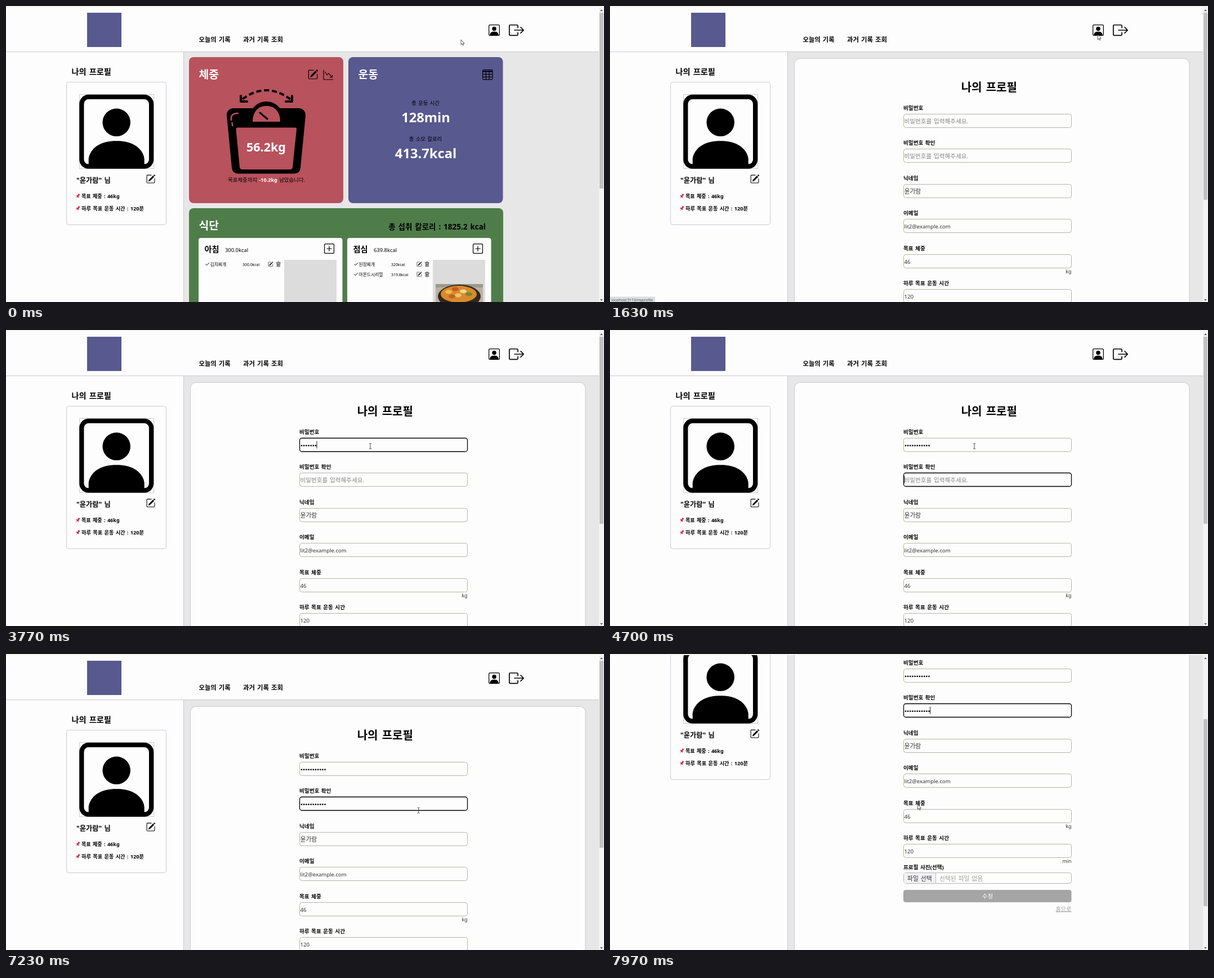
Write an HTML page that moves like this. It is 1062 px wide and 527 px high and loops after 8 s.

```html
<!DOCTYPE html>
<html lang="ko">
<head>
<meta charset="utf-8">
<title>나의 프로필</title>
<style>
html, body { margin: 0; width: 100%; height: 100%; overflow: hidden; background: #fdfdfd; }
svg { display: block; width: 100vw; height: 100vh; }
text { font-family: "Noto Sans", "Noto Sans CJK KR", "Noto Sans CJK", sans-serif; word-spacing: .1em; white-space: pre; }
</style>
</head>
<body>
<svg id="stage" viewBox="0 0 1062 527" xmlns="http://www.w3.org/2000/svg"></svg>
<script>
const RED = '#b8525c', PURPLE = '#57598f', GREEN = '#4f7d4a', LINE = '#c9cad6';

const rect = (x, y, w, h, fill, r = 0, extra = '') =>
  `<rect x="${x}" y="${y}" width="${w}" height="${h}" rx="${r}" fill="${fill}" ${extra}/>`;
const text = (x, y, size, str, { w = 400, fill = '#000', anchor = 'start', extra = '' } = {}) =>
  `<text x="${x}" y="${y}" font-size="${size}" font-weight="${w}" fill="${fill}" text-anchor="${anchor}" ${extra}>${str}</text>`;
const bold = (x, y, size, str, fill = '#000', anchor = 'start') =>
  text(x, y, size, str, { w: 700, fill, anchor });

// Icons on a 16 unit grid
const stroke = (d, w = 1) =>
  `<path d="${d}" fill="none" stroke="#000" stroke-width="${w}" stroke-linecap="round" stroke-linejoin="round"/>`;
const icons = {
  edit: stroke('M9 1.5H2.5a1 1 0 0 0-1 1v11a1 1 0 0 0 1 1h11a1 1 0 0 0 1-1v-6') +
    '<path d="M12.5 1.7l1.9 1.9 1.1-1.1a.5.5 0 0 0 0-.7L14.2.6a.5.5 0 0 0-.7 0zM11.8 2.4l2 2-7 6.9-2.8.9.9-2.8z"/>',
  graph: stroke('M.5 .5v15h15M2.8 3.4L6 8.2l2.5-2.6 5 6.2M10.5 12H14V8.5'),
  table: stroke('M2 .5h12a1.5 1.5 0 0 1 1.5 1.5v12a1.5 1.5 0 0 1-1.5 1.5H2A1.5 1.5 0 0 1 .5 14V2A1.5 1.5 0 0 1 2 .5zM.5 7.5h15M.5 11.5h15M5.5 4v11.5M10.5 4v11.5') +
    '<path d="M.5 2h15v2H.5z"/>',
  person: '<circle cx="8" cy="6" r="3"/><path fill-rule="evenodd" d="M2 0h12a2 2 0 0 1 2 2v12a2 2 0 0 1-2 2H2a2 2 0 0 1-2-2V2a2 2 0 0 1 2-2zM14 1H2a1 1 0 0 0-1 1v12a1 1 0 0 0 1 1v-1c0-1 1-4 6-4s6 3 6 4v1a1 1 0 0 0 1-1V2a1 1 0 0 0-1-1z"/>',
  exit: stroke('M9.5 5.5v-2a1 1 0 0 0-1-1h-7a1 1 0 0 0-1 1v9a1 1 0 0 0 1 1h7a1 1 0 0 0 1-1v-2M6 8h9.400M12.500 5l3 3-3 3'),
  plus: stroke('M2 .5h12a1.5 1.5 0 0 1 1.5 1.5v12a1.5 1.5 0 0 1-1.5 1.5H2A1.5 1.5 0 0 1 .5 14V2A1.5 1.5 0 0 1 2 .5zM8 4.3v7.4M4.3 8h7.4', 1.1),
  trash: stroke('M2 3.2h12M6 3V1.2h4V3M3.2 3.5l.7 11.5h8.2l.7-11.5M6 6v6.5M8 6v6.5M10 6v6.5', 1.1),
  check: stroke('M2 8.5l4 4L14 4', 2),
  pin: '<g transform="rotate(38 8 8)" stroke-linecap="round"><path d="M8 10v6" stroke="#777" stroke-width="1.4"/><path d="M5 0h6v2l-1 1v3.5l3 2.5v2H3V9l3-2.5V3L5 2z" fill="#d21f3a"/></g>'
};
const icon = (name, x, y, size) => `<g transform="translate(${x} ${y}) scale(${size / 16})">${icons[name]}</g>`;

function frame() {
  return rect(0, 0, 1062, 81, '#fdfdfd') + rect(0, 81, 1062, 1, LINE) +
    rect(144, 12, 61, 61, PURPLE) +
    bold(342.5, 63.5, 11.3, '오늘의 기록') + bold(421, 63.5, 11.4, '과거 기록 조회') +
    icon('person', 857, 33, 20) + icon('exit', 893, 29.5, 27) +
    rect(0, 82, 315, 800, '#fdfdfd') + rect(315, 82, 1, 800, LINE) +
    bold(116.5, 121.5, 14.2, '나의 프로필') +
    rect(107.5, 135.5, 177, 254, '#fdfdfd', 4, `stroke="${LINE}"`) +
    rect(130.5, 157.5, 132, 132, 'none', 0, 'stroke="#ccc"') + icon('person', 130.2, 157.8, 132) +
    bold(125, 315, 12.2, '"윤가람" 님') + icon('edit', 248.5, 299.5, 17) +
    icon('pin', 123, 334, 9) + bold(134, 342, 9.1, '목표 체중 : 46kg') +
    icon('pin', 123, 356, 9) + bold(134, 364, 9.2, '하루 목표 운동 시간 : 120분');
}

function scaleArt() {
  return `<path d="M420 166Q462 134 505 166" fill="none" stroke="#000" stroke-width="4" stroke-dasharray="9 5"/>
    <path d="M417 160v10h11M508 160v10h-11" fill="none" stroke="#000" stroke-width="4" stroke-linecap="round" stroke-linejoin="round"/>
    <circle cx="462.5" cy="200" r="30"/>
    <path d="M404 182H520a12 12 0 0 1 12 13L523 288q-1 10.500-12 10.500H413q-11 0-12-10.500L392 195a12 12 0 0 1 12-13z"/>
    <path d="M438 206C438 188 448 178 462.500 178S487 188 487 206z" fill="${RED}"/>
    <path d="M451 190L464 201" stroke="#000" stroke-width="3" stroke-linecap="round"/>
    <path d="M411 216.500H513.500q3 0 2.500 3L509 287q-.5 4-5 4H420q-4.500 0-5-4L408.500 219.500q-.5-3 2.500-3z" fill="${RED}"/>
    <path d="M400 203q-2-12 12-12M401.500 208l.8 5" fill="none" stroke="${RED}" stroke-width="2.500" stroke-linecap="round"/>`;
}

function foodRow(x, y, name, kcal) {
  return icon('check', x + 11.5, y - 7, 8) + text(x + 20.5, y, 7.8, name) + text(x + 78, y, 6.9, kcal) +
    icon('edit', x + 123, y - 7.5, 9.5) + icon('trash', x + 137, y - 7.5, 9.5);
}

function meal(x, name, kcal, rows) {
  return rect(x, 413, 255.5, 300, '#fdfdfd', 4) + bold(x + 10.5, 437.5, 14.2, name) +
    text(x + 47, 437.5, 9.4, kcal) + icon('plus', x + 223, 423, 18) +
    rect(x + 152, 452, 93, 100, '#dcdcdc') +
    rows.map((r, i) => foodRow(x, 462.5 + 18 * i, ...r)).join('');
}

function soup() {
  const bits = [[786, 509, '#e8c04a'], [798, 504, '#c8552a'], [812, 508, '#f0d68a'], [822, 513, '#6f8a35'], [803, 515, '#eac566'], [792, 517, '#c2602a']];
  return rect(763, 495, 84, 40, '#b9b2a3') + rect(763, 495, 84, 6, '#9b9a8d') +
    '<ellipse cx="805" cy="517" rx="38" ry="21" fill="#33271f"/><ellipse cx="804" cy="513" rx="32" ry="15" fill="#d98a2b"/>' +
    bits.map(([x, y, c]) => `<ellipse cx="${x}" cy="${y}" rx="6" ry="3.500" fill="${c}"/>`).join('');
}

function dashboard() {
  return rect(325, 91, 274, 260, RED, 8) + bold(342.5, 128.5, 19.3, '체중', '#fff') +
    icon('edit', 535.5, 112.5, 19) + icon('graph', 563.5, 113.5, 18) + scaleArt() +
    bold(462, 259, 21.5, '56.2kg', '#fff', 'middle') +
    text(462.5, 312.5, 9.4, '목표체중까지 <tspan font-weight="700" fill="#fff" font-size="9.1">-10.2kg</tspan> 남았습니다.', { anchor: 'middle' }) +
    rect(608, 91, 274.5, 260, PURPLE, 8) + bold(625.5, 128.5, 19.3, '운동', '#fff') + icon('table', 846, 113, 18.5) +
    text(745, 175.5, 9.3, '총 운동 시간', { w: 500, anchor: 'middle' }) +
    bold(745.5, 207, 23.7, '128min', '#fff', 'middle') +
    text(745, 239.5, 9.4, '총 소모 칼로리', { w: 500, anchor: 'middle' }) +
    bold(745.5, 270.5, 23.7, '413.7kcal', '#fff', 'middle') +
    rect(325, 360, 558, 400, GREEN, 8) + bold(342.5, 398, 19.3, '식단', '#fff') +
    bold(852, 397.5, 13.5, '총 섭취 칼로리 : 1825.2 kcal', '#000', 'end') +
    meal(342, '아침', '300.0kcal', [['김치찌개', '300.0kcal']]) +
    meal(606, '점심', '639.8kcal', [['된장찌개', '320kcal'], ['아몬드시리얼', '319.8kcal']]) + soup();
}

const fieldY = i => Math.round(192 + 62.4 * i) + 0.5;
function profile() {
  const fields = [['비밀번호'], ['비밀번호 확인'], ['닉네임', '윤가람', 10.8], ['이메일', 'lit2@example.com', 9.5],
    ['목표 체중', '46', 9.7], ['하루 목표 운동 시간', '120', 9.7]];
  const note = (y, str) => text(819.5, y, 8.9, str, { anchor: 'end', fill: '#333' });
  return rect(327.5, 93.5, 701.5, 700, '#fdfdfd', 10, `stroke="${LINE}"`) +
    bold(673.3, 151.5, 20, '나의 프로필', '#000', 'middle') +
    fields.map(([label, value, size], i) =>
      bold(521, fieldY(i) - 7.2, 9.6, label) +
      rect(521.5, fieldY(i), 298, 24, '#fdfdfd', 4, `id="box${i}" stroke="#b5b5a6"`) +
      (value ? text(522.5, fieldY(i) + 16.3, size, value, { fill: '#333' }) : `<g id="secret${i}"></g>`)).join('') +
    note(475.5, 'kg') + note(538, 'min') +
    bold(521, 548.8, 9.6, '프로필 사진(선택)') +
    rect(521.5, 555.5, 298, 19, '#fdfdfd', 4, 'stroke="#b5b5b0"') +
    rect(522, 556, 56, 18, '#f3f3f6', 3) + rect(578, 556, 1, 18, '#b9b9c8') +
    text(528, 570, 10.8, '파일 선택', { fill: '#333' }) + text(585, 570, 10.8, '선택된 파일 없음', { fill: '#a0a0a0' }) +
    rect(521, 586, 298.5, 22, '#a5a5a5', 4) +
    text(670.5, 601, 10.6, '수정', { fill: '#fff', anchor: 'middle' }) +
    text(819.5, 623.5, 10.2, '홈으로', { fill: '#a0a0a0', anchor: 'end', extra: 'text-decoration="underline"' });
}

document.getElementById('stage').innerHTML =
  rect(0, 0, 1062, 527, '#fdfdfd') +
  `<g id="page">${rect(316, 82, 738, 800, '#e7e7e7')}${frame()}<g id="home">${dashboard()}</g><g id="form">${profile()}</g></g>` +
  rect(0, 0, 1062, 2, '#fdfdfd') + rect(0, 1, 1062, 1, '#f1f1e2') +
  rect(1053, 2, 9, 525, '#f3f3f3') + rect(1054, 12, 7, 333, '#c1c1c1', 0, 'id="thumb"') +
  '<path d="M1055 9l2.500-3 2.500 3zM1055 522l2.500 3 2.500-3z" fill="#606060"/>' +
  `<g id="status">${rect(0, 517.5, 80, 10, '#dcdee1')}${text(2.5, 525.5, 6.35, 'localhost:5173/myprofile', { fill: '#555' })}</g>` +
  `<g id="cursor"><path id="arrow" d="M0 0v8.800l2-1.800 1.400 3 1.400-.7-1.400-2.900h2.700z" fill="#fff" stroke="#333" stroke-width=".8"/>
   <path id="beam" d="M-2-5h1.500l.5.500.5-.5H2M-2 4.500h1.500l.5-.5.5.5H2M0-4.500V4" fill="none" stroke="#333" stroke-width=".9"/></g>`;

const $ = id => document.getElementById(id);
const show = (id, on) => { $(id).style.display = on ? '' : 'none'; };

// Eased track through [time, ...values] points
function track(points, t, ease = k => k) {
  let i = 0;
  while (i < points.length - 2 && t >= points[i + 1][0]) i++;
  const [a, b] = [points[i], points[i + 1]];
  const k = ease(Math.min(1, Math.max(0, (t - a[0]) / (b[0] - a[0]))));
  return a.slice(1).map((v, j) => v + (b[j + 1] - v) * k);
}
const smooth = k => k * k * (3 - 2 * k);

const pointer = [[0, 808, 60], [150, 808, 60], [700, 866, 51], [1750, 866, 51], [2350, 645.5, 209],
  [2500, 645.5, 209], [2600, 647, 207], [6750, 647, 207], [7250, 733, 279], [7720, 733, 279], [7970, 546.5, 268]];
const wheel = [[7430, 0], [7500, 26], [7570, 66], [7640, 112], [7710, 148], [7770, 162], [7830, 166]];
const secrets = [
  { start: 2890, step: 130, focus: 2680, blur: 4550 },
  { start: 4930, step: 165, focus: 4550, blur: 9000 }
];
const LENGTH = 11;

function drawSecret(s, i, t) {
  const n = Math.max(0, Math.min(LENGTH, Math.floor((t - s.start) / s.step) + 1));
  const focused = t >= s.focus && t < s.blur;
  const y = fieldY(i) + 13.3;
  const lastKey = n ? s.start + (n - 1) * s.step : s.focus;
  let out = n ? '' : text(522.5, fieldY(i) + 16, 10.6, '비밀번호를 입력해주세요.', { fill: '#858585' });
  for (let d = 0; d < n; d++) out += `<circle cx="${525 + 4.15 * d}" cy="${y}" r="1.400"/>`;
  if (focused && (t - lastKey) % 1000 < 500) out += rect(522.5 + 4.15 * n, y - 8, 0.9, 13, '#000');
  $('secret' + i).innerHTML = out;
  $('box' + i).setAttribute('stroke', focused ? '#000' : '#b5b5a6');
  $('box' + i).setAttribute('stroke-width', focused ? 1.3 : 1);
}

function render(t) {
  const onForm = t >= 1500;
  const [scroll] = track(wheel, t);
  const [x, y] = track(pointer, t, smooth);
  const beam = t >= 2300 && t < 7780;
  show('home', !onForm);
  show('form', onForm);
  show('status', t >= 600 && t < 1900);
  show('beam', beam);
  show('arrow', !beam);
  $('page').setAttribute('transform', `translate(0 ${-scroll})`);
  $('thumb').setAttribute('y', 12 + scroll * 0.627);
  $('thumb').setAttribute('height', onForm ? 333 : 313);
  $('cursor').setAttribute('transform', `translate(${x} ${y})`);
  secrets.forEach((s, i) => drawSecret(s, i, t));
}

const begin = performance.now();
function tick() {
  render((performance.now() - begin) % 8000);
  requestAnimationFrame(tick);
}
tick();
</script>
</body>
</html>
```
